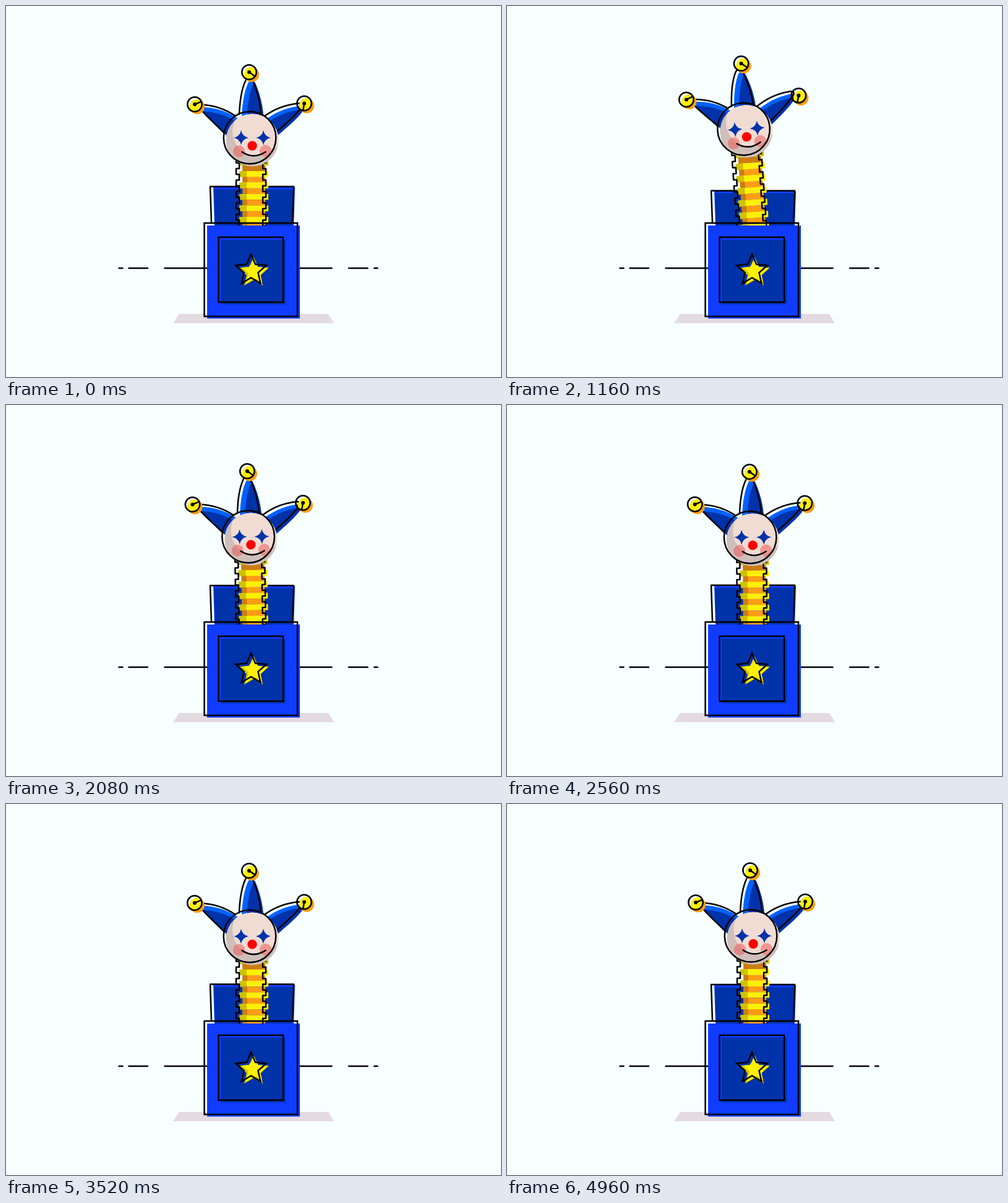
An HTML page for the animation above (5000 ms loop, 800 by 600 pixels).

```html
<!DOCTYPE html>
<html lang="en">
<head>
<meta charset="utf-8">
<title>Jack in the box</title>
<style>
  html, body { margin: 0; width: 100%; height: 100%; overflow: hidden; background: #f7ffff; }
  svg { display: block; width: 800px; height: 600px; }
  .line { fill: none; stroke: #000; stroke-width: 2.5; stroke-linecap: round; stroke-linejoin: round; }
  .line * { vector-effect: non-scaling-stroke; }
  .navy { fill: #0032aa; }
  .blue { fill: #0f3cff; }
  .sky { fill: #0062ff; }
  .yellow { fill: #fff000; }
  .olive { fill: #cfc200; }
  .orange { fill: #ff9c14; }
  .rust { fill: #cc7d10; }
</style>
</head>
<body>
<svg viewBox="0 0 800 600">
  <defs>
    <path id="hornL" d="M371 178C352 165 331 160 314 159.5Q310 160 313 165C325 180 340 192 353 206"/>
    <path id="hornT" d="M377 175C378 150 382 132 387 121Q393 110 399 121C405 135 411 155 412 175"/>
    <path id="hornR" d="M418 178C436 165 455 159 474 157.5Q481 158 478 163C466 180 450 192 435.500 205"/>
    <path id="star"/>
    <path id="eye" d="M0-12Q2-2 12 0Q2 2 0 12Q-2 2-12 0Q-2-2 0-12"/>
    <clipPath id="clipL"><use href="#hornL"/></clipPath>
    <clipPath id="clipT"><use href="#hornT"/></clipPath>
    <clipPath id="clipR"><use href="#hornR"/></clipPath>
    <clipPath id="clipStar"><use href="#star"/></clipPath>
    <clipPath id="clipHead"><circle cx="398" cy="217" r="42.500"/></clipPath>
    <clipPath id="clipBell"><circle cx="4" cy="4" r="12"/></clipPath>
    <g id="bell">
      <g clip-path="url(#clipBell)">
        <circle class="orange" cx="4" cy="4" r="13"/>
        <circle class="yellow" r="11.500"/>
      </g>
      <circle class="line" r="11.700"/>
      <circle r="3"/>
    </g>
  </defs>

  <path id="shadow" fill="#e4dbe1" d="M280 498H521L530 513H270Z"/>
  <path class="line" d="M182.500 424H188.500M198.500 424H229M256.500 424H526.500M554 424H584.500M595 424H600.500"/>

  <g id="back">
    <g id="lid">
      <path class="blue" d="M335 293H467L465 357H337Z"/>
      <path class="navy" d="M336 296.500H464L462.500 357H338Z"/>
      <g class="line"><path d="M332 351L330 292H465L463 351"/></g>
    </g>
  </g>

  <g id="jack">
    <g id="spring">
      <g id="rings"></g>
      <g class="line"><path id="coil"/></g>
    </g>
    <g transform="translate(4 4)">
      <use href="#hornL" class="sky"/>
      <g clip-path="url(#clipL)"><use href="#hornL" class="navy" y="7"/></g>
      <use href="#hornT" class="sky"/>
      <g clip-path="url(#clipT)"><use href="#hornT" class="navy" x="8" y="3"/></g>
      <use href="#hornR" class="sky"/>
      <g clip-path="url(#clipR)"><use href="#hornR" class="navy" x="1" y="6"/></g>
    </g>
    <g class="line">
      <use href="#hornL"/><use href="#hornT"/><use href="#hornR"/>
    </g>
    <g clip-path="url(#clipHead)">
      <circle cx="398" cy="217" r="43" fill="#cfbfba"/>
      <circle cx="406" cy="203" r="40" fill="#f0dcd3"/>
    </g>
    <g fill="#f04f4f" fill-opacity=".5">
      <circle cx="376.500" cy="235" r="9.700"/>
      <circle cx="419.500" cy="234.500" r="9.700"/>
    </g>
    <use href="#eye" class="navy" x="380" y="213"/>
    <use href="#eye" class="navy" x="416" y="213"/>
    <circle cx="398" cy="226" r="7.700" fill="#f00"/>
    <path class="line" d="M381.500 236Q400 248.500 419.500 236"/>
    <circle class="line" cx="394" cy="213" r="42.300"/>
    <g id="bellL">
      <use href="#bell" x="305" y="159"/><path class="line" d="M305 159l10-4"/>
    </g>
    <g id="bellT">
      <use href="#bell" x="393" y="107"/><path class="line" d="M393 107l8.500 6"/>
    </g>
    <g id="bellR">
      <use href="#bell" x="482" y="157.500"/><path class="line" d="M482 157.500l-1.700 10"/>
    </g>
  </g>

  <g id="front">
    <path class="blue" d="M325 355H475V505.500H325Z"/>
    <path class="navy" d="M347 378H452V482.500H347Z"/>
    <g transform="translate(400 431.500)" clip-path="url(#clipStar)">
      <use href="#star" class="olive"/>
      <use href="#star" class="yellow" x="3" y="-3"/>
    </g>
    <g class="line" style="stroke-linejoin:miter">
      <path d="M320.500 351H471V502H320.500Z"/>
      <path d="M343.500 374H448V479H343.500Z"/>
      <use href="#star" x="396" y="427.500"/>
    </g>
  </g>
</svg>

<script>
const $ = id => document.getElementById(id);
const place = (id, transform) => $(id).setAttribute('transform', transform);

// Static shapes that follow a rule
const corners = Array.from({ length: 10 }, (_, i) => {
  const r = i % 2 ? 12 : 26, a = i * Math.PI / 5;
  return (r * Math.sin(a)).toFixed(2) + ' ' + (-r * Math.cos(a)).toFixed(2);
});
$('star').setAttribute('d', 'M' + corners.join('L') + 'Z');

const NECK = 244.5, PITCH = 18.5, BAND = 9.25;
let rings = '', left = `M377 ${NECK}`, right = `M415 ${NECK}`;
const band = (cls, x, y, w) =>
  `<rect class="${cls}" x="${x}" y="${y}" width="${w}" height="${BAND + .1}"/>`;
for (let k = 0; k < 10; k++) {
  const y = NECK + k * PITCH, fy = y + 4;
  rings += band(k ? 'yellow' : 'olive', 377, fy, 47) + band('olive', 377, fy, 12)
    + band(k ? 'orange' : 'rust', 382, fy + BAND, 37) + band('rust', 382, fy + BAND, 8);
  left += `V${y}H372v${BAND}H377`;
  right += `V${y}H420v${BAND}H415`;
}
$('rings').innerHTML = rings;
$('coil').setAttribute('d', left + right);

// Smooth curve through [time, value] pairs, held flat outside them
function track(...keys) {
  const slope = i => i <= 0 || i >= keys.length - 1 ? 0
    : (keys[i + 1][1] - keys[i - 1][1]) / (keys[i + 1][0] - keys[i - 1][0]);
  return t => {
    if (t <= keys[0][0]) return keys[0][1];
    const i = keys.findIndex(k => k[0] >= t) - 1;
    if (i < 0) return keys[keys.length - 1][1];
    const [t0, a] = keys[i], [t1, b] = keys[i + 1];
    const d = t1 - t0, u = (t - t0) / d, u2 = u * u, u3 = u2 * u;
    return a * (2 * u3 - 3 * u2 + 1) + b * (3 * u2 - 2 * u3)
      + d * (slope(i) * (u3 - 2 * u2 + u) + slope(i + 1) * (u3 - u2));
  };
}

// Two swings per second that die away after the jump
const W = 4 * Math.PI;
const swing = t => -6.1 * Math.exp(-1.9 * (t - 1.1)) * Math.cos(W * (t - 1.1));
const bounce = t => 16.5 * Math.exp(-1.1 * (t - 1.2)) * Math.sin(W * (t - 1.08));
const flap = t => -4.6 * Math.exp(-1.9 * (t - 1.16)) * Math.cos(W * (t - 1.08));

const LAND = .84;
const then = (start, rest) => t => t < LAND ? start(t) : rest(t);
const lean = then(track([.28, 0], [.4, -9], [.51, -21], [.68, 4], [.78, 9], [LAND, swing(LAND)]), swing);
const lift = then(track([.28, 0], [.44, -50], [.53, 0], [.63, 60], [.68, 47], [LAND, bounce(LAND)]), bounce);
const spread = then(track([.28, 0], [.44, 4], [.54, -10], [.68, 10], [LAND, flap(LAND)]), flap);
const lidSize = then(track([.28, 1], [.44, .9], [.6, 1.1], [.68, 1.09], [LAND, 1.02]), t => 1 - .0079 * bounce(t));
const slide = track([.28, 0], [.5, -6], [.68, 7], [.84, 8], [1, 0]);
const wide = track([.28, 1], [.44, 1.04], [.58, .955], [.68, .955], [.94, .985], [1.03, 1.025], [1.14, 1]);
const tall = track([.28, 1], [.44, .9], [.58, 1.05], [.68, 1.04], [.94, 1.015], [1.03, .96], [1.14, 1]);
const shade = track([.28, 1], [.48, 1], [.7, .96], [.84, .962], [1.05, .988], [1.2, 1]);

function hop(t) {
  const u = (t - .5) / .5;
  return u > 0 && u < 1 ? 112 * u * (1 - u) : 0;
}

function draw(t) {
  const h = hop(t), sy = tall(t), a = lean(t), v = lift(t), turn = -.6 * a, s = spread(t);
  const box = `translate(395.5 ${502 - h}) scale(${wide(t)} ${sy}) translate(-395.5 -502)`;
  place('back', box);
  place('front', box);
  place('lid', `translate(0 351) scale(1 ${lidSize(t)}) translate(0 -351)`);
  place('shadow', `translate(400 0) scale(${shade(t)} 1) translate(-400 0)`);
  place('jack', `translate(${slide(t)} ${-h - 151 * (sy - 1)}) rotate(${a} 396 365) translate(0 ${-v})`);
  place('spring', `translate(0 ${NECK}) scale(1 ${1 + v / 213}) translate(0 ${-NECK})`);
  place('bellL', `rotate(${turn + s} 394 213)`);
  place('bellT', `rotate(${turn} 394 213)`);
  place('bellR', `rotate(${turn - s} 394 213)`);
}

const start = performance.now();
function tick() {
  const ms = (performance.now() - start) % 5000;
  draw(Math.floor(ms / 40) * .04); // 25 poses per second
  requestAnimationFrame(tick);
}
tick();
</script>
</body>
</html>
```
